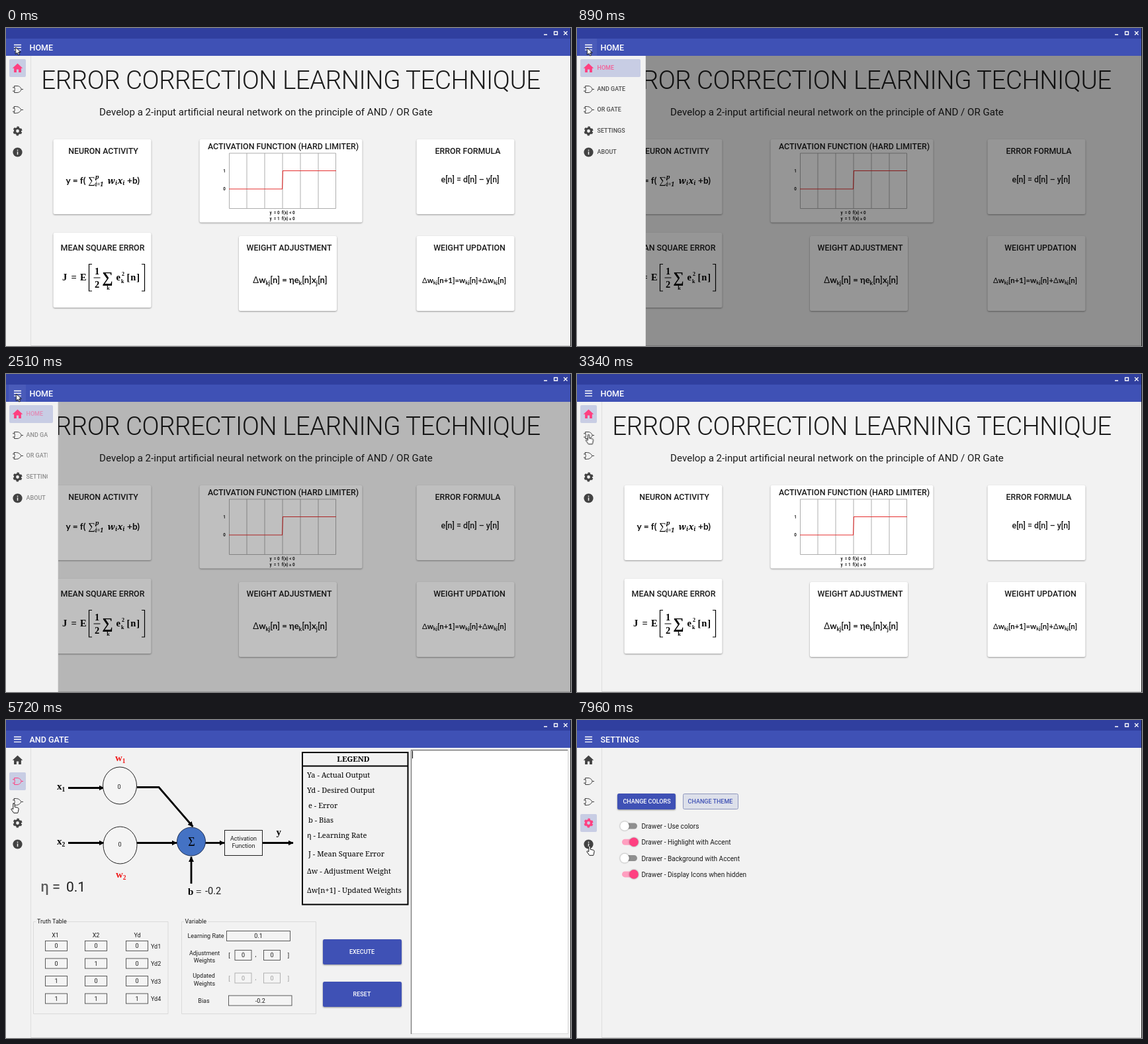
Animation, 854 px wide and 480 px high, one loop 8 s. Source, as an HTML page:

```html
<!DOCTYPE html>
<html lang="en">
<head>
<meta charset="utf-8">
<title>Learning technique demo</title>
<style>
@property --p { syntax: "<number>"; inherits: true; initial-value: 0; }
@property --s { syntax: "<number>"; inherits: true; initial-value: 0; }
html, body { margin: 0; width: 100%; height: 100%; overflow: hidden; background: #f2f2f2; }
#stage { position: relative; width: 854px; height: 480px; overflow: hidden; background: #f2f2f2; animation: drawer 8s infinite; }
svg { position: absolute; left: 0; top: 0; display: block; }
text { font-family: Roboto, sans-serif; fill: #1c1c1c; white-space: pre; }
.m { text-anchor: middle; }
.serif text, text.serif { font-family: "Liberation Serif", serif; font-weight: 700; fill: #000; }
.math text { font-family: "Noto Serif", serif; font-weight: 700; font-style: italic; fill: #000; }
.lato { font-family: Lato, sans-serif; font-weight: 700; fill: #111; }
.slab text { font-family: "Noto Serif", serif; font-weight: 500; font-size: 11.1px; fill: #000; }
.small text { font-size: 9px; }
.head text { font-size: 12.4px; font-weight: 500; text-anchor: middle; }
.cards rect { fill: #fff; filter: drop-shadow(0 1px 1px rgba(0,0,0,.38)); }
.btn { fill: #3f51b5; filter: drop-shadow(0 1px 1px rgba(0,0,0,.4)); }
.onbtn { fill: #fff; font-size: 9px; font-weight: 500; text-anchor: middle; }
.wire path { fill: none; stroke: #000; stroke-width: 2.8; marker-end: url(#tip); }
.field { fill: #f4f4f4; stroke: #4a4a4a; stroke-width: .9; }
.dim .field { stroke: #aaa; }
.dim text { fill: #9a9a9a; }

/* drawer */
#shade { position: absolute; left: 0; top: 42px; width: 853px; height: 438px; background: #000; opacity: calc(var(--p) * .54); }
#drawer { position: absolute; left: 0; top: 42px; height: 438px; width: calc(37px + 87px * var(--p)); overflow: hidden; background: #f2f2f2; border-right: 1px solid #dedede; }
.item { position: absolute; left: 5px; height: 27px; width: calc(25px + 87px * var(--p)); color: color-mix(in srgb, #ff4081 calc(var(--s) * 100%), #424242); animation: 8s infinite; }
.item i { position: absolute; inset: 0; border-radius: 2px; background: #c8cde4; opacity: var(--s); }
.item div { position: absolute; left: 0; top: 0; height: 27px; width: calc(17px + 87px * var(--p)); overflow: hidden; }
.item span { position: absolute; left: 25.5px; top: 0; font: 500 9px/27px Roboto, sans-serif; white-space: nowrap; opacity: var(--p); color: color-mix(in srgb, #ff4081 calc(var(--s) * 100%), #1c1c1c); }

/* timing: AND page at 4150 ms, OR page at 5980 ms, settings at 6710 ms */
.on-home, .on-and, .on-or, .on-set, .on-net { animation: 8s step-end infinite; }
.on-home { animation-name: pageHome; }
.on-and { animation-name: pageAnd; }
.on-or { animation-name: pageOr; }
.on-set { animation-name: pageSet; }
.on-net { animation-name: pageNet; }
@keyframes pageHome { 0% { visibility: visible; } 51.875%, 100% { visibility: hidden; } }
@keyframes pageAnd { 0%, 74.75%, 100% { visibility: hidden; } 51.875% { visibility: visible; } }
@keyframes pageOr { 0%, 83.875%, 100% { visibility: hidden; } 74.75% { visibility: visible; } }
@keyframes pageSet { 0% { visibility: hidden; } 83.875%, 100% { visibility: visible; } }
@keyframes pageNet { 0%, 83.875%, 100% { visibility: hidden; } 51.875% { visibility: visible; } }
@keyframes selHome { 0%, 51.875% { --s: 1; } 55%, 100% { --s: 0; } }
@keyframes selAnd { 0%, 51.875%, 77.5%, 100% { --s: 0; } 55%, 74.75% { --s: 1; } }
@keyframes selOr { 0%, 74.75%, 87%, 100% { --s: 0; } 77.5%, 83.875% { --s: 1; } }
@keyframes selSet { 0%, 83.875% { --s: 0; } 87%, 100% { --s: 1; } }
@keyframes drawer {
  0%, 33.75%, 100% { --p: 0; }
  8.1% { --p: 0; animation-timing-function: cubic-bezier(.55,0,.45,1); }
  12.9% { --p: 1; }
  28.88% { --p: 1; animation-timing-function: cubic-bezier(.55,0,.45,1); }
}
#hover { fill: #fff; opacity: 0; animation: hover 8s infinite; }
@keyframes hover { 0%, 8.1%, 34%, 100% { opacity: 0; } 10%, 32% { opacity: .06; } }
#caret { animation: caret 8s step-end infinite; }
@keyframes caret {
  0%, 58.875%, 72.125%, 81.375%, 100% { opacity: 0; }
  52%, 65.5%, 74.75% { opacity: 1; }
}
#cursor { animation: move 8s ease-in-out infinite; }
@keyframes move {
  0%, 6.37% { transform: translate(14.5px,29px); }
  6.38%, 37.5% { transform: translate(15.5px,30px); }
  41.75%, 57% { transform: translate(17.5px,91.5px); }
  60.75%, 76.25% { transform: translate(12px,126px); }
  79.6%, 93.875% { transform: translate(16px,158px); }
  99.5%, 100% { transform: translate(19px,190px); }
}
#arrow { animation: arrow 8s step-end infinite; }
#hand { animation: hand 8s step-end infinite; }
@keyframes arrow { 0% { opacity: 1; } 38.9%, 100% { opacity: 0; } }
@keyframes hand { 0% { opacity: 0; } 38.9%, 100% { opacity: 1; } }
</style>
</head>
<body>
<div id="stage">
<svg width="854" height="480" viewBox="0 0 854 480">
  <defs>
    <marker id="tip" markerUnits="userSpaceOnUse" markerWidth="9" markerHeight="9" refX="7.5" refY="4" orient="auto"><path d="M0 0L8 4 0 8z"/></marker>
  </defs>
  <path d="M38 479.5H853" stroke="#cfcfcf"/>

  <g class="on-home">
    <text class="m" x="430.5" y="91.5" font-size="38.5" font-weight="300" letter-spacing="-.5">ERROR CORRECTION LEARNING TECHNIQUE</text>
    <text class="m" x="393" y="132" font-size="15.1">Develop a 2-input artificial neural network on the principle of AND / OR Gate</text>
    <g class="cards">
      <rect x="71.5" y="168" width="148" height="113" rx="2.5"/>
      <rect x="292.5" y="168" width="246" height="125.5" rx="2.5"/>
      <rect x="620.5" y="168" width="148" height="113" rx="2.5"/>
      <rect x="71.5" y="309" width="148" height="113" rx="2.5"/>
      <rect x="352" y="314" width="148" height="113" rx="2.5"/>
      <rect x="620.5" y="314" width="148" height="113" rx="2.5"/>
    </g>
    <g class="head">
      <text x="147" y="190">NEURON ACTIVITY</text>
      <text x="419" y="183">ACTIVATION FUNCTION (HARD LIMITER)</text>
      <text x="698" y="190">ERROR FORMULA</text>
      <text x="146" y="335.7">MEAN SQUARE ERROR</text>
      <text x="428" y="335.7">WEIGHT ADJUSTMENT</text>
      <text x="700.5" y="335.7">WEIGHT UPDATION</text>
      <text x="701.5" y="233">e[n] = d[n] – y[n]</text>
    </g>

    <text class="lato" x="90.5" y="234.5" font-size="13.6">y = f(</text>
    <text class="lato" x="183" y="234.5" font-size="13.6">+b)</text>
    <g class="math" font-size="13">
      <text x="124" y="235" font-size="15" style="font-style:normal;font-weight:400">∑</text>
      <text x="135" y="228" font-size="9">p</text>
      <text x="134.5" y="238.5" font-size="8.5">i=1</text>
      <text x="153.5" y="234.5">w<tspan font-size="8.5" dy="2">i</tspan></text>
      <text x="168.5" y="234.5">x<tspan font-size="8.5" dy="2">i</tspan></text>
    </g>

    <path d="M337.5 189V272.5H498.5V189zM364 189V272M391 189V272M418 189V272M445 189V272M472 189V272" fill="none" stroke="#9a9a9a" stroke-width=".8"/>
    <path d="M337 243H417.5L418.5 215.5H499" fill="none" stroke="#e53030" stroke-width="1.1"/>
    <g font-size="6.3" font-weight="700">
      <text class="m" x="330" y="217.5">1</text>
      <text class="m" x="330" y="245">0</text>
      <text class="m" x="417.5" y="281">y  = 0  f(x) &lt; 0</text>
      <text class="m" x="417.5" y="289.5">y  = 1  f(x) ≥ 0</text>
    </g>

    <g class="serif" font-size="14.5">
      <text x="85" y="381">J</text><text x="98.5" y="381">=</text><text x="112" y="381">E</text>
      <text class="m" x="137.5" y="371.5">1</text><text class="m" x="137.5" y="392">2</text>
      <text class="m" x="153.5" y="384" font-size="23">∑</text>
      <text class="m" x="154.5" y="395" font-size="8">k</text>
      <text x="166.5" y="381">e</text><text x="175" y="373.5" font-size="8">2</text><text x="174" y="385" font-size="8">k</text>
      <text x="182.5" y="381" letter-spacing=".9">[n]</text>
      <path d="M130 356.5H125.5V397H130M205 356.5H209.5V397H205M132.5 377H142.5" fill="none" stroke="#000" stroke-width="1.2"/>
    </g>

    <text class="lato m" x="429.5" y="385" font-size="13"><tspan font-weight="400">Δ</tspan>w<tspan font-size="8.5" dy="2.5">kj</tspan><tspan dy="-2.5">[n] = ηe</tspan><tspan font-size="8.5" dy="2.5">k</tspan><tspan dy="-2.5">[n]x</tspan><tspan font-size="8.5" dy="2.5">j</tspan><tspan dy="-2.5">[n]</tspan></text>
    <text class="lato m" x="692.5" y="384.5" font-size="11.4"><tspan font-weight="400">Δ</tspan>w<tspan font-size="7.8" dy="2.5">kj</tspan><tspan dy="-2.5">[n+1]=w</tspan><tspan font-size="7.8" dy="2.5">kj</tspan><tspan dy="-2.5">[n]+</tspan><tspan font-weight="400">Δ</tspan>w<tspan font-size="7.8" dy="2.5">kj</tspan><tspan dy="-2.5">[n]</tspan></text>
  </g>

  <g class="on-net">
    <g class="wire">
      <path d="M94 102.5H148"/>
      <path d="M94 185.5H148"/>
      <path d="M198 101.5H231L282.5 161"/>
      <path d="M198 185.5H258"/>
      <path d="M301 185.5H330"/>
      <path d="M388 185.5H434"/>
      <path d="M280 247V206.5"/>
    </g>
    <g fill="#f4f4f4" stroke="#222">
      <ellipse cx="172" cy="99" rx="25.5" ry="28"/>
      <ellipse cx="172.5" cy="189" rx="25.5" ry="28"/>
      <circle cx="280" cy="183.5" r="21.5" fill="#4472c4" stroke="#1d2f55"/>
      <rect x="330.5" y="166.5" width="57" height="38"/>
    </g>
    <g class="small">
      <text class="m" x="171" y="103.5">0</text>
      <text class="m" x="172" y="190.5">0</text>
      <text class="m" x="359" y="182">Activation</text>
      <text class="m" x="359" y="193">Function</text>
    </g>
    <g class="serif" font-size="15">
      <text class="m" x="280.5" y="190" font-size="18" style="font-weight:400">Σ</text>
      <text x="77" y="105">x<tspan font-size="9.5" dy="3">1</tspan></text>
      <text x="77" y="188">x<tspan font-size="9.5" dy="3">2</tspan></text>
      <text x="165" y="62" style="fill:#f01818">w<tspan font-size="9.5" dy="3">1</tspan></text>
      <text x="166" y="238" style="fill:#f01818">w<tspan font-size="9.5" dy="3">2</tspan></text>
      <text x="408.5" y="174">y</text>
      <text x="275" y="264">b <tspan style="font-weight:400">=</tspan></text>
    </g>
    <text x="301" y="263" font-size="14.5">-0.2</text>
    <text x="52.5" y="259" font-size="21.5" font-weight="500" style="fill:#5c5c5c">η =</text>
    <text x="91" y="259" font-size="21">0.1</text>

    <path d="M448 49H607.5V278.5H448zM448 69.5H607" fill="none" stroke="#000" stroke-width="2"/>
    <g class="slab" id="legend"><text class="m" x="525" y="62.5" style="font-size:11.5px;font-weight:600">LEGEND</text></g>

    <rect x="612.5" y="45.5" width="237" height="428" fill="#fff" stroke="#d9d9d9"/>
    <path d="M612.5 474V45.5H849" fill="none" stroke="#777" stroke-width="1.3"/>
    <path id="caret" d="M614.5 46.5V58" stroke="#000"/>

    <path d="M45 304.5H41.5V443.5H245V304.5H92M269 304.5H265.5V443.5H468.5V304.5H305" fill="none" stroke="#dadada"/>
    <g class="small" id="forms">
      <text x="47" y="307">Truth Table</text>
      <text x="270.5" y="307">Variable</text>
      <text class="m" x="74.5" y="328">X1</text>
      <text class="m" x="136" y="328">X2</text>
      <text class="m" x="198.5" y="328">Yd</text>
      <text class="m" x="302" y="329">Learning Rate</text>
      <text class="m" x="300" y="355">Adjustment</text>
      <text class="m" x="300" y="366">Weights</text>
      <text class="m" x="299" y="389">Updated</text>
      <text class="m" x="300" y="400.5">Weights</text>
      <text class="m" x="299" y="426.5">Bias</text>
    </g>
    <rect class="btn" x="479" y="331" width="119" height="38" rx="2.5"/>
    <rect class="btn" x="479" y="395" width="119" height="38" rx="2.5"/>
    <text class="onbtn" x="538" y="353">EXECUTE</text>
    <text class="onbtn" x="538" y="417">RESET</text>
  </g>

  <g class="on-set">
    <rect class="btn" x="61" y="111" width="88" height="24" rx="2.5"/>
    <text class="onbtn" x="105.5" y="126.3">CHANGE COLORS</text>
    <rect x="160.5" y="111.5" width="83" height="23" rx="2" fill="#dde0ea" stroke="#8f97bd"/>
    <text class="onbtn" x="201.5" y="126.3" style="fill:#3f51b5">CHANGE THEME</text>
    <g id="switches"></g>
  </g>
</svg>

<div id="shade"></div>
<div id="drawer"></div>

<svg width="854" height="480" viewBox="0 0 854 480">
  <path d="M0 0H854V16H0z" fill="#303f9f"/>
  <path d="M0 16H854V42H0z" fill="#3f51b5"/>
  <rect id="hover" x="4" y="16" width="26" height="26"/>
  <path d="M12 25.5H23M12 29.3H23M12 33.1H23" stroke="#fff" stroke-width="1.4"/>
  <path d="M813 10H818M828.5 5.5H833.5V10H828.5zM843 5L848.5 10.5M848.5 5L843 10.5" fill="none" stroke="#fff" stroke-width="1.3"/>
  <g font-size="12.5" font-weight="500" id="titles"></g>
  <path d="M853.5 0V480" stroke="#1a1a1a"/>
  <g id="cursor" stroke="#000" stroke-width=".9" fill="#fff" stroke-linejoin="round">
    <path id="arrow" d="M0 0V10.5L2.5 8.3 4.2 12 6 11.2 4.3 7.6H7.6z"/>
    <path id="hand" d="M-1.2 1.2a1.2 1.2 0 0 1 2.4 0V5.3L5.6 6.3Q7.3 6.8 7.1 8.6L6.4 12.3 5.7 14.3H-.2L-4.3 8.6Q-3.6 6.9-1.2 8.6z"/>
  </g>
</svg>
</div>
<script>
const el = id => document.getElementById(id);
const add = (id, html) => el(id).insertAdjacentHTML("beforeend", html);
const text = (x, y, s, cls = "") => `<text class="${cls}" x="${x}" y="${y}">${s}</text>`;
const field = (x, y, w, s) =>
  `<rect class="field" x="${x}" y="${y}" width="${w}" height="15"/>` + text(x + w / 2, y + 10.8, s, "m");

const legend = [[455, 87, "Ya - Actual Output"], [455, 110, "Yd - Desired Output"], [457, 132.5, "e - Error"],
  [457, 155, "b - Bias"], [455, 178, "η - Learning Rate"], [457, 206, "J - Mean Square Error"],
  [455, 232, "Δw - Adjustment Weight"], [455, 261, "Δw[n+1] - Updated Weights"]];
add("legend", legend.map(l => text(...l)).join(""));

let table = "";
for (let r = 0; r < 4; r++) {
  const y = 333.5 + r * 26.5, a = r >> 1, b = r & 1;
  table += field(59.5, y, 33, a) + field(119.5, y, 33, b) +
    `<g class="on-and">${field(181.5, y, 33, a & b)}</g>` +
    `<g class="on-or">${field(181.5, y, 33, a | b)}</g>` +
    text(219, y + 11.3, "Yd" + (r + 1));
}
const pair = y => text(337.5, y + 10.5, "[", "m") + field(346, y, 25, 0) + text(377.5, y + 9.5, ",", "m") +
  field(389.5, y, 25, 0) + text(427, y + 10.5, "]", "m");
table += field(333.5, 318.5, 96, "0.1") + pair(347.5) + `<g class="dim">${pair(382)}</g>` + field(336.5, 416, 95.5, "-0.2");
add("forms", table);

add("switches", ["Use colors", "Highlight with Accent", "Background with Accent", "Display Icons when hidden"].map((s, i) => {
  const y = 160 + i * 24.3, on = i % 2;
  return `<rect x="68" y="${y - 4.5}" width="23" height="9" rx="4.5" fill="${on ? "#ff9fc0" : "#8f8f8f"}"/>
    <circle cx="${on ? 86 : 72}" cy="${y}" r="6.8" fill="${on ? "#ff4081" : "#fff"}" style="filter:drop-shadow(0 .6px .8px rgba(0,0,0,.45))"/>
    <text x="97.5" y="${y + 4}" font-size="10.1">Drawer - ${s}</text>`;
}).join(""));

// icons are centred on 0,0
const stroke = d => `<path d="${d}" fill="none" stroke="currentColor" stroke-width="1"/>`;
const leads = "M-7.5-2.7H-4.5M-7.5 2.7H-4.5M5.5 0H8.5";
const icons = [
  `<path d="M0-7L-7.8 .3H-5.4V6.5H-1.6V2H1.6V6.5H5.4V.3H7.8z" fill="currentColor"/>`,
  stroke("M-5-5H-.5C3-5 5.5-2 5.5 0S3 5-.5 5H-5Q-3.3 0-5-5z" + leads),
  stroke("M-5.5-5H-2C2-5 4.5-2 5.5 0C4.5 2 2 5-2 5H-5.5Q-2.8 0-5.5-5z" + leads),
  `<g fill="none" stroke="currentColor"><circle r="4" stroke-width="3.2"/><circle r="5.9" stroke-width="2.2" stroke-dasharray="3.3 2.878" transform="rotate(14)"/></g>`,
  `<circle r="7.1" fill="currentColor"/><path d="M0-1V3.7M0-3.8V-2.3" stroke="#f2f2f2" stroke-width="1.5"/>`
];
const names = ["HOME", "AND GATE", "OR GATE", "SETTINGS", "ABOUT"];
const keys = ["Home", "And", "Or", "Set"];
add("drawer", names.map((n, i) =>
  `<div class="item" style="top:${5 + i * 31.7}px;animation-name:${keys[i] ? "sel" + keys[i] : "none"}"><i></i>
   <svg width="25" height="27" viewBox="-12.5 -13.5 25 27">${icons[i]}</svg><div><span>${n}</span></div></div>`).join(""));
add("titles", keys.map((k, i) =>
  `<g class="on-${k.toLowerCase()}"><text x="35.5" y="33.7" style="fill:#fff">${names[i]}</text></g>`).join(""));
</script>
</body>
</html>
```
